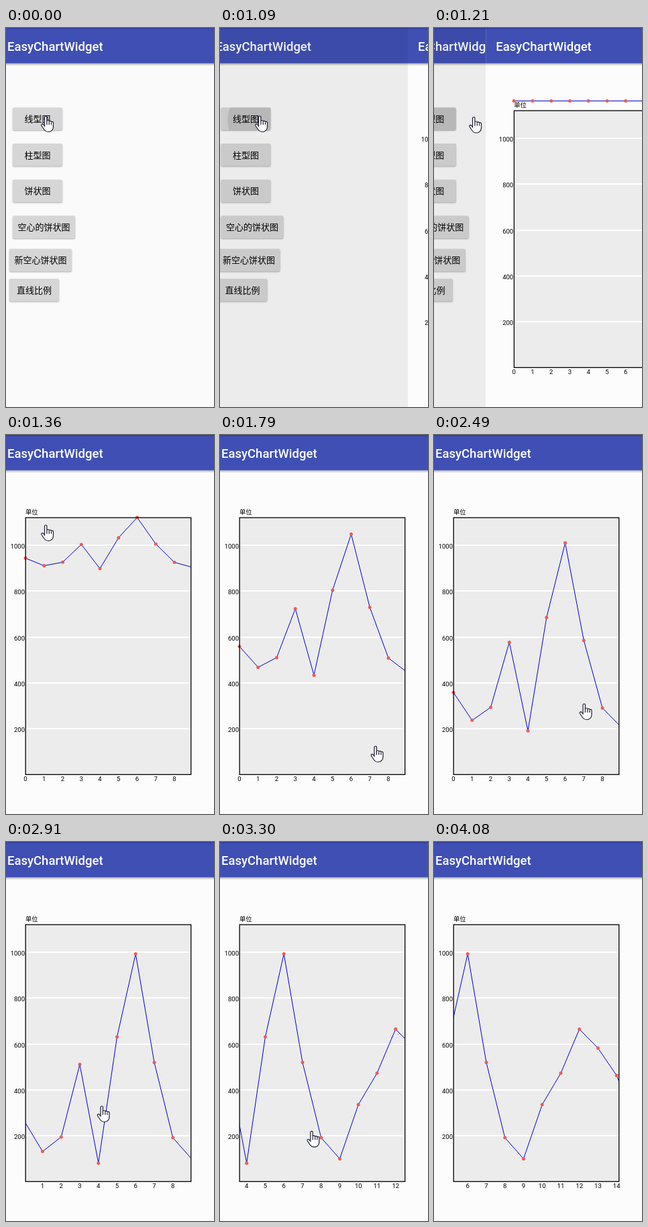
An HTML page with a canvas for the animation above (4710 ms loop, 310 px wide and 564 px high).

```html
<!DOCTYPE html>
<html lang="zh">
<head>
<meta charset="utf-8">
<style>
html, body { margin: 0; width: 100%; height: 100%; overflow: hidden; background: #fafafa; }
canvas { display: block; }
</style>
</head>
<body>
<canvas id="stage" width="310" height="564"></canvas>
<script>
const ctx = document.getElementById('stage').getContext('2d');
const FONT = 'Roboto, "Noto Sans CJK SC", "Noto Sans CJK", sans-serif';
const LOOP = 4710, TAP = 1090, TICK = 136;

// The phone screen is wider than the stage.
const SCREEN_X = -13, SCREEN_W = 334, BAR = 52.6;

// Chart geometry; points drop from DROP to their values.
const LEFT = 29, RIGHT = 276, TOP = 123, BOTTOM = 505.3;
const STEP = 27.75, UNIT = .3415, ZERO = 505.6, DROP = 108.6;
const VALUES = [267, 132, 195, 511, 81, 631, 993, 520, 192, 100, 336, 473, 665, 582, 463, 257];

// Key points of the pointer: tick, x, y.
const HAND = [[0, 62, 143], [2, 62, 146], [4, 160, 309], [5, 234.5, 475], [6, 240, 523],
  [10, 226.5, 412], [13, 145.5, 405], [15, 88, 408], [18, 242, 511], [22, 284, 578]];

const HAND_SHAPE = new Path2D('M-4.5 3V-10q0-2 1.7-2t1.7 2V-4q0-1.5 1.7-1.5t1.7 1.7v.6q0-1.5 1.6-1.5' +
  't1.6 1.7v.6q0-1.3 1.5-1.3t1.5 1.8V4q0 3-1.8 5.2t-4.7 2.3h-1.5q-3 0-5-2.5L-8.7 3q-1.2-1.8 0-2.7t2.4.4z');
const HAND_CREASES = new Path2D('M-1.1-4v5M2.3-3v4M5.5-2v3');

const clamp = u => Math.max(0, Math.min(1, u));
const smooth = u => u * u * (3 - 2 * u);

// Motions by tick since the tap.
const slideAt = n => 293 * clamp(1 - n / 2) ** 1.7;
const panAt = n => -145.3 * smooth(clamp((n - 12.6) / 5.4));
function growAt(n) {
  const m = Math.max(0, n > 9 ? n - 2 : n - 1); // stalls for one tick
  return 1 - Math.exp(-.28 * m) * (1 - clamp(m / 11) ** 10);
}
function handAt(n) {
  const i = Math.max(1, HAND.findIndex(key => key[0] >= n));
  const [n0, x0, y0] = HAND[i - 1], [n1, x1, y1] = HAND[i];
  const k = (n - n0) / (n1 - n0);
  return [x0 + (x1 - x0) * k, y0 + (y1 - y0) * k];
}

function rect(x, y, w, h, color) {
  ctx.fillStyle = color;
  ctx.fillRect(x, y, w, h);
}

function text(str, x, y, size, align = 'left', color = '#000', weight = 400) {
  ctx.font = `${weight} ${size}px ${FONT}`;
  ctx.textAlign = align;
  ctx.fillStyle = color;
  ctx.fillText(str, x, Math.round(y));
}

function shifted(x, y, paint) {
  ctx.save();
  ctx.translate(x, y);
  paint();
  ctx.restore();
}

function page(background) {
  rect(SCREEN_X, 0, SCREEN_W, 564, background);
  const shadow = ctx.createLinearGradient(0, BAR, 0, BAR + 4);
  shadow.addColorStop(0, 'rgba(0,0,0,.28)');
  shadow.addColorStop(1, 'rgba(0,0,0,0)');
  rect(SCREEN_X, BAR, SCREEN_W, 4, shadow);
  rect(SCREEN_X, 0, SCREEN_W, BAR, '#3f4fb4');
  rect(SCREEN_X, 0, SCREEN_W, 1.5, '#303f9f');
  text('EasyChartWidget', 2, 34, 18.5, 'left', '#fff', 500);
}

function button(label, x, y, pressed) {
  const w = Math.max(74, label.length * 13 + 15);
  const shape = new Path2D();
  shape.roundRect(x, y, w, 33.5, 2);
  ctx.save();
  ctx.shadowColor = 'rgba(0,0,0,.3)';
  ctx.shadowBlur = 2;
  ctx.shadowOffsetY = 1;
  ctx.fillStyle = '#d6d6d7';
  ctx.fill(shape);
  ctx.restore();
  if (pressed) {
    ctx.save();
    ctx.clip(shape);
    ctx.beginPath();
    ctx.arc(x + 60, y + 19, 50, 0, 7);
    ctx.fillStyle = '#c2c2c3';
    ctx.fill();
    ctx.restore();
  }
  text(label, x + w / 2, y + 21.5, 13, 'center');
}

function home(pressed) {
  page('#fafafa');
  ['线型图', '柱型图', '饼状图', '空心的饼状图'].forEach((label, i) =>
    button(label, 10, 118.4 + i * 53.7, pressed && i === 0));
  ['新空心饼状图', '直线比例'].forEach((label, i) => button(label, 5, 328.8 + i * 44.4));
}

function chart(grow, pan) {
  page('#fcfcfc');
  rect(LEFT, TOP, RIGHT - LEFT, BOTTOM - TOP, '#ececec');
  for (let v = 200; v <= 1000; v += 200) {
    const y = ZERO - v * UNIT;
    rect(LEFT, Math.round(y) - 1, RIGHT - LEFT, 2, '#fff');
    text(v, 28, y + 5, 9.5, 'right');
  }
  text('单位', LEFT, 118, 9.3);

  const dots = VALUES.map((v, i) =>
    [LEFT + i * STEP + pan, DROP + (ZERO - v * UNIT - DROP) * grow]);
  ctx.save();
  ctx.beginPath();
  ctx.rect(LEFT, 57, RIGHT - LEFT, 450);
  ctx.clip();
  ctx.beginPath();
  dots.forEach(([x, y]) => ctx.lineTo(x, y));
  ctx.strokeStyle = '#0000cd';
  ctx.lineWidth = 1;
  ctx.stroke();
  ctx.restore();

  dots.forEach(([x, y], i) => {
    if (x < LEFT || x > RIGHT) return;
    ctx.beginPath();
    ctx.arc(x, y, 2.5, 0, 7);
    ctx.fillStyle = '#e85c5c';
    ctx.fill();
    text(i, x, 515, 9.5, 'center');
  });
  ctx.strokeStyle = '#000';
  ctx.lineWidth = 1.3;
  ctx.strokeRect(LEFT + .2, TOP, RIGHT - LEFT - .5, BOTTOM - TOP);
}

function hand() {
  ctx.fillStyle = '#fff';
  ctx.fill(HAND_SHAPE);
  ctx.strokeStyle = '#1c1c30';
  ctx.lineWidth = 1.2;
  ctx.stroke(HAND_SHAPE);
  ctx.stroke(HAND_CREASES);
}

function draw(time) {
  const tapped = time >= TAP;
  const n = tapped ? Math.min(22, Math.floor((time - TAP + 20) / TICK)) : 0;
  const slide = slideAt(n);

  if (!tapped) {
    home(false);
  } else {
    if (slide > 0) {
      shifted((slide - SCREEN_W) * .21, 0, () => home(true));
      rect(0, 0, 310, 564, 'rgba(0,0,0,.056)');
    }
    shifted(slide, 0, () => chart(growAt(n), panAt(n)));
  }
  if (n < 22) shifted(...handAt(n), hand);
}

const start = performance.now();
function loop() {
  draw((performance.now() - start) % LOOP);
  requestAnimationFrame(loop);
}
loop();
</script>
</body>
</html>
```
